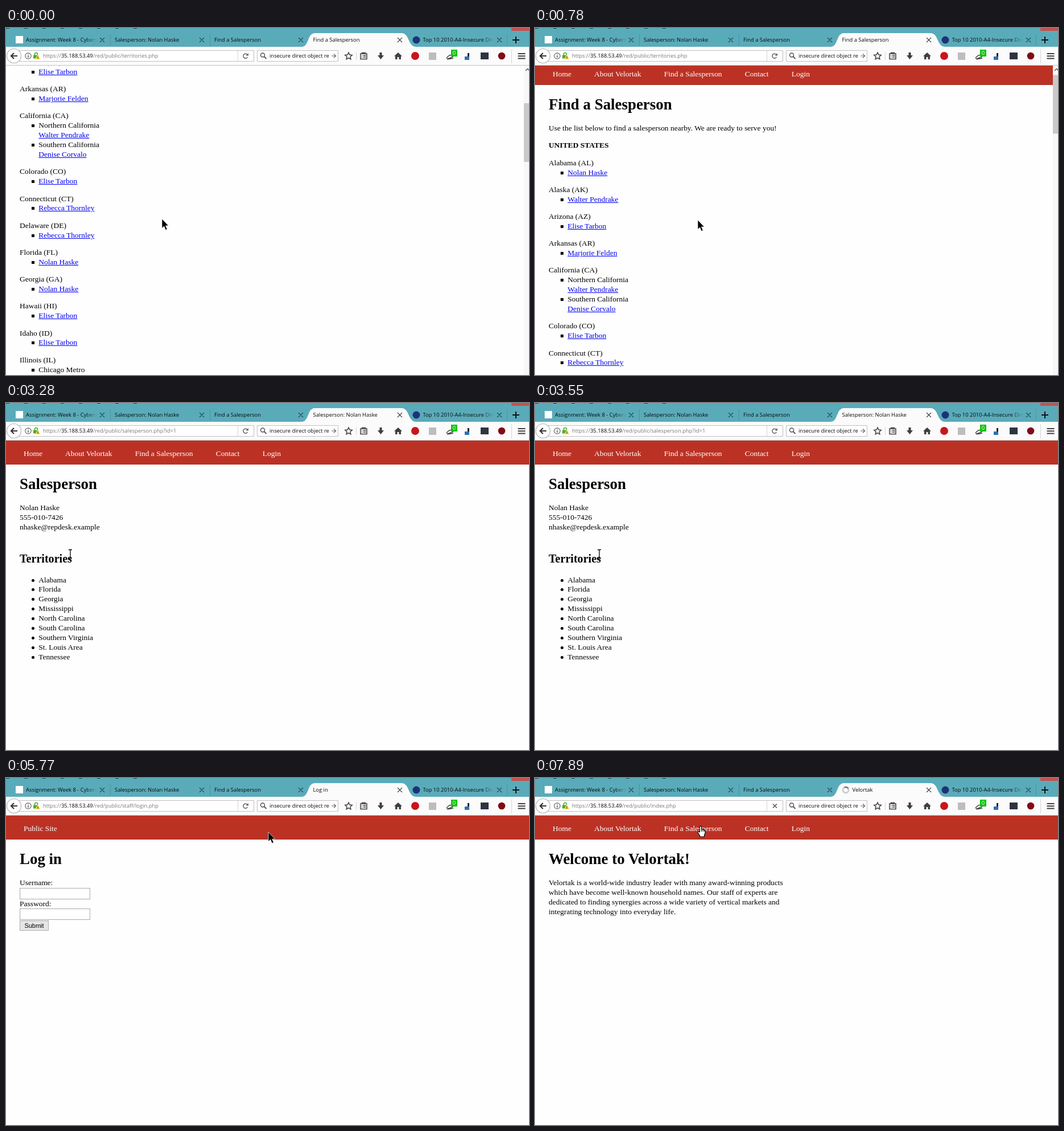
An HTML page that plays this animation: 919x609 px, repeating every 8000 ms.

```html
<!DOCTYPE html>
<html lang="en">
<head>
<meta charset="utf-8">
<title>Browser session</title>
<style>
/* One loop is 8 s, so 1% is 80 ms. */
@property --n { syntax: "<number>"; inherits: true; initial-value: 0; }
@property --y { syntax: "<number>"; inherits: true; initial-value: 0; }
@property --busy { syntax: "<number>"; inherits: true; initial-value: 0; }

html, body { margin: 0; width: 100%; height: 100%; overflow: hidden; background: #fefefe; }
#stage { position: absolute; left: 0; top: 0; width: 919px; height: 609px; overflow: hidden; white-space: nowrap; }
#stage, #stage * { box-sizing: border-box; }
.abs, .chrome > * { position: absolute; }
.chrome, .view, .reel, .spin, .cursor, .cursor g { animation: 8s step-end infinite; }

/* Browser frame */
.chrome { position: absolute; inset: 0; height: 66px; color: #0a0a0a;
  font: 9.4px/14px "Open Sans", "Noto Sans", sans-serif; }
.chrome { animation-name: busy; }
.chrome svg { left: 0; top: 0; }
.tab { top: 14px; height: 14px; overflow: hidden; }
.fade { mask-image: linear-gradient(to left, transparent, #000 22px); }
.title { left: 539.5px; width: 143px; padding-left: calc(var(--busy) * 18px); }
.url { left: 65px; top: 42px; width: 340px; height: 14px; overflow: hidden; color: #777; }
.url b { font-weight: 400; color: #0a0a0a; }
.reel { height: 100%; transform: translateY(calc(var(--n) * -100%)); }
.reel > div { height: 100%; }
.title .reel { animation-name: titles; }
.url .reel { animation-name: urls; }
.when-busy { opacity: var(--busy); }
.when-idle { opacity: calc(1 - var(--busy)); }
.spin { transform-origin: 546px 21px; animation-name: spin; }

/* Web pages */
.view { left: 0; top: 66px; width: 919px; height: 543px; overflow: hidden; color: #000;
  font: 13.48px/16.9px "Liberation Serif", "Times New Roman", serif; animation-name: scroll; }
.pages { animation-name: pages; }
.page { position: relative; overflow: hidden; }
.sheet { width: 910px; transform: translateY(calc(var(--y) * -1px)); }
nav { height: 42px; padding: 14.6px 0 0 31px; display: flex; gap: 40.2px; background: #bb3225; color: #fff; border-bottom: 1px solid #a92c20; }
h1 { font-size: 26.9px; line-height: 32px; margin: 18px 24px; }
h2 { font-size: 20.1px; line-height: 24px; margin: 34.2px 24px 17.6px; }
p { margin: 13.4px 24px 0; }
ul { list-style: none; margin: 0; padding: 0 0 0 57.3px; }
li { position: relative; }
li::before { content: ""; position: absolute; left: -12px; top: 6px; width: 5px; height: 5px; background: #000; }
.disc li::before { border-radius: 50%; }
u { color: #00e; }
.plain ul { padding: 14px 0 0 37px; }
.plain u { color: #551a8b; }
.plain h1 { margin: 17.5px 4px 18px; }
.plain p { margin: 0 4px; }
.field { left: 23.5px; width: 124px; height: 20px; border: 1px solid #aaa; background: #fff; }
.button { left: 24px; top: 183.5px; width: 51px; height: 18px; border: 1px solid #adadad; background: #e6e6e6;
  font: 11px/17px "Liberation Sans", Arial, sans-serif; text-align: center; }
.track { left: 910px; top: 0; width: 9px; height: 543px; background: #f7f7f7; }
.thumb { left: 0; top: 15px; width: 9px; height: 103px; background: #c9c9c9; transform: translateY(calc(var(--y) * .183px)); }

/* Pointer */
.cursor { left: 0; top: 0; overflow: visible; animation-name: move; }
.cursor .arrow { animation-name: arrow; }
.cursor .hand { animation-name: hand; }
.cursor .beam { animation-name: beam; }

@keyframes scroll {
  0% { --y: 279; } 1.625% { --y: 246; } 3.25% { --y: 196; } 4.875% { --y: 138; }
  6.5% { --y: 84; } 8.125% { --y: 36; } 9.75% { --y: 8; } 11.5%, 100% { --y: 0; }
}
@keyframes pages {
  0% { --n: 0; } 41% { --n: 1; } 66.875% { --n: 2; } 85.125% { --n: 3; } 92.125%, 100% { --n: 4; }
}
@keyframes titles {
  0% { --n: 0; } 35.875% { --n: 1; } 41% { --n: 2; } 58.75% { --n: 1; }
  66.875% { --n: 3; } 85.125%, 100% { --n: 4; }
}
@keyframes urls {
  0% { --n: 0; } 35.875% { --n: 1; } 58.75% { --n: 2; } 85.125%, 100% { --n: 3; }
}
@keyframes busy {
  0%, 41%, 66.875%, 92.125% { --busy: 0; }
  29%, 57.25%, 80.125%, 98.625%, 100% { --busy: 1; }
}
@keyframes spin {
  0%, 29% { color: #777; transform: none; }
  30.5% { color: #777; transform: rotate(-120deg); }
  32.125% { color: #777; transform: rotate(-240deg); }
  35.875% { color: #3a9be0; transform: rotate(60deg); }
  57.25% { color: #777; transform: rotate(-60deg); }
  58.75% { color: #3a9be0; transform: rotate(40deg); }
  63.5% { color: #3a9be0; transform: rotate(160deg); }
  80.125% { color: #777; transform: none; }
  81.625% { color: #777; transform: rotate(-120deg); }
  85.125% { color: #3a9be0; transform: rotate(20deg); }
  90.125% { color: #3a9be0; transform: rotate(120deg); }
  98.625%, 100% { color: #777; transform: rotate(-30deg); }
}
@keyframes move {
  0% { transform: translate(274px, 335px); }
  6.5% { transform: translate(279px, 336px); }
  9.75% { transform: translate(286px, 337px); }
  16.5% { transform: translate(268px, 331px); }
  18.25% { transform: translate(218px, 306px); }
  20% { transform: translate(162px, 282px); }
  21.875% { transform: translate(120px, 266px); }
  23.625% { transform: translate(114px, 264px); }
  41% { transform: translate(113px, 265px); }
  46.25% { transform: translate(150px, 242px); }
  48.125% { transform: translate(240px, 195px); }
  49.875% { transform: translate(350px, 142px); }
  51.625% { transform: translate(435px, 106px); }
  53.375% { transform: translate(463px, 94px); }
  70.375% { transform: translate(462px, 95px); }
  72.125% { transform: translate(461px, 95px); }
  73.75% { transform: translate(385px, 98px); }
  75.375% { transform: translate(250px, 98px); }
  77% { transform: translate(125px, 96px); }
  78.625% { transform: translate(64px, 92px); }
  85.125% { transform: translate(72px, 90px); }
  86.875% { transform: translate(150px, 84px); }
  88.5% { transform: translate(232px, 78px); }
  90.125% { transform: translate(276px, 75px); }
  92.125% { transform: translate(281px, 78px); }
  93.625% { transform: translate(290px, 84px); }
  98.625%, 100% { transform: translate(291px, 84px); }
}
@keyframes arrow {
  0%, 46.25%, 66.875%, 85.125% { visibility: visible; }
  21.875%, 53.375%, 78.625%, 93.625%, 100% { visibility: hidden; }
}
@keyframes hand {
  0%, 41%, 66.875%, 85.125% { visibility: hidden; }
  21.875%, 53.375%, 78.625%, 93.625%, 100% { visibility: visible; }
}
@keyframes beam {
  0%, 46.25%, 100% { visibility: hidden; }
  41% { visibility: visible; }
}
</style>
</head>
<body>
<div id="stage">

<div class="view abs"><div class="reel pages">
  <div class="page">
    <div class="sheet">
      <nav><span>Home</span><span>About Velortak</span><span>Find a Salesperson</span><span>Contact</span><span>Login</span></nav>
      <h1>Find a Salesperson</h1>
      <p>Use the list below to find a salesperson nearby. We are ready to serve you!</p>
      <p><b>UNITED STATES</b></p>
      <p>Alabama (AL)</p><ul><li><u>Nolan Haske</u></li></ul>
      <p>Alaska (AK)</p><ul><li><u>Walter Pendrake</u></li></ul>
      <p>Arizona (AZ)</p><ul><li><u>Elise Tarbon</u></li></ul>
      <p>Arkansas (AR)</p><ul><li><u>Marjorie Felden</u></li></ul>
      <p>California (CA)</p><ul><li>Northern California<br><u>Walter Pendrake</u></li><li>Southern California<br><u>Denise Corvalo</u></li></ul>
      <p>Colorado (CO)</p><ul><li><u>Elise Tarbon</u></li></ul>
      <p>Connecticut (CT)</p><ul><li><u>Rebecca Thornley</u></li></ul>
      <p>Delaware (DE)</p><ul><li><u>Rebecca Thornley</u></li></ul>
      <p>Florida (FL)</p><ul><li><u>Nolan Haske</u></li></ul>
      <p>Georgia (GA)</p><ul><li><u>Nolan Haske</u></li></ul>
      <p>Hawaii (HI)</p><ul><li><u>Elise Tarbon</u></li></ul>
      <p>Idaho (ID)</p><ul><li><u>Elise Tarbon</u></li></ul>
      <p>Illinois (IL)</p><ul><li>Chicago Metro</li></ul>
    </div>
    <div class="track abs">
      <div class="thumb abs"></div>
      <svg class="abs" width="9" height="14"><path d="M3 9l3.5-3.5L10 9" fill="none" stroke="#555" stroke-width="1.4"/></svg>
    </div>
  </div>

  <div class="page">
    <nav><span>Home</span><span>About Velortak</span><span>Find a Salesperson</span><span>Contact</span><span>Login</span></nav>
    <h1>Salesperson</h1>
    <p>Nolan Haske<br>555-010-7426<br>nhaske@repdesk.example</p>
    <h2>Territories</h2>
    <ul class="disc">
      <li>Alabama</li><li>Florida</li><li>Georgia</li><li>Mississippi</li><li>North Carolina</li>
      <li>South Carolina</li><li>Southern Virginia</li><li>St. Louis Area</li><li>Tennessee</li>
    </ul>
  </div>

  <div class="page">
    <nav><span>Public Site</span></nav>
    <h1>Log in</h1>
    <p>Username:</p>
    <div class="field abs" style="top:127px"></div>
    <div class="abs" style="left:24px;top:146.6px">Password:</div>
    <div class="field abs" style="top:163px"></div>
    <div class="button abs">Submit</div>
  </div>

  <div class="page plain">
    <ul class="disc">
      <li><u>Home</u></li><li><u>About Velortak</u></li><li><u>Find a Salesperson</u></li><li><u>Contact</u></li><li><u>Login</u></li>
    </ul>
    <h1>Welcome to Velortak!</h1>
    <p>Velortak is a world-wide industry leader with many award-winning products which have become well-known household names. Our staff of experts are dedicated to<br>finding synergies across a wide variety of vertical markets and integrating technology into everyday life.</p>
  </div>

  <div class="page">
    <nav><span>Home</span><span>About Velortak</span><span>Find a Salesperson</span><span>Contact</span><span>Login</span></nav>
    <h1>Welcome to Velortak!</h1>
    <p>Velortak is a world-wide industry leader with many award-winning products<br>which have become well-known household names. Our staff of experts are<br>dedicated to finding synergies across a wide variety of vertical markets and<br>integrating technology into everyday life.</p>
  </div>
</div></div>

<div class="chrome">
  <svg width="919" height="66" fill="none" stroke-width="1.2">
    <path fill="#5aabba" d="M0 0h919v33H0z"/>
    <path d="M0 .5h240" stroke="#1d3940" stroke-width="1" stroke-dasharray="6 26"/>
    <path fill="#c9504f" d="M888 0h31v5h-31z"/>
    <path d="M183.5 11v20M358.5 11v20M880.5 11v20" stroke="#4894a2" stroke-width="1"/>
    <path fill="#fbfbfb" d="M0 33H520C533 32 529 9 543 9H695C709 9 706 32 720 33H919V65H0z"/>
    <path d="M0 65.5h919" stroke="#c4c4c4" stroke-width="1"/>
    <path fill="#fff" d="M17 14h13v13H17z"/>
    <circle cx="721" cy="21" r="6.5" fill="#1c3377"/>
    <path d="M165 17l8 8m0-8l-8 8M340 17l8 8m0-8l-8 8M514 17l8 8m0-8l-8 8M863 17l8 8m0-8l-8 8" stroke="#244a53"/>
    <path d="M688 17l8 8m0-8l-8 8" stroke="#444"/>
    <path d="M890 21h12m-6-6v12" stroke="#111" stroke-width="2"/>
    <!-- address and search boxes -->
    <path d="M20.5 39.5h415v19h-415zM441.5 39.5h142v19h-142z" fill="#fff" stroke="#c0c0c0" stroke-width="1"/>
    <path d="M407.5 40v18" stroke="#d4d4d4" stroke-width="1"/>
    <circle cx="14" cy="49" r="12.5" fill="#fff" stroke="#b4b4b4"/>
    <path d="M20 49H9m5-5l-5 5 5 5" stroke="#333" stroke-width="2.2"/>
    <circle cx="39" cy="49" r="5.2" stroke="#666"/>
    <path d="M39 48v4M39 45.5v1.3" stroke="#555" stroke-width="1.4"/>
    <path d="M50.5 48v-2a2.5 2.5 0 0 1 5 0v2" stroke="#4caf26" stroke-width="1.6"/>
    <path d="M48 47.5h9v6h-9z" fill="#4caf26"/>
    <path d="M56 47l4.5 8h-9z" fill="#f7c52d" stroke="#fff" stroke-width=".6"/>
    <path d="M56 50v2.5m0 .6v1" stroke="#333" stroke-width="1"/>
    <g class="when-idle">
      <path d="M424.5 51a4 4 0 1 1-.4-4.3" stroke="#666" stroke-width="1.5"/>
      <path d="M426 44v4.5h-4.5z" fill="#666"/>
    </g>
    <path class="when-busy" d="M418 45.5l7 7m0-7l-7 7" stroke="#555" stroke-width="1.5"/>
    <circle cx="451" cy="47.5" r="3.5" stroke="#555" stroke-width="1.5"/>
    <path d="M453.5 50l4 4" stroke="#555" stroke-width="1.8"/>
    <path d="M572 49h7m-3-3.5l3.5 3.5-3.5 3.5" stroke="#666"/>
    <!-- toolbar -->
    <path d="M602 43l1.9 4 4.3.5-3.2 3 .8 4.4-3.8-2.2-3.8 2.2.8-4.4-3.2-3 4.3-.5z" stroke="#3f3f3f" stroke-width="1.5"/>
    <path d="M615.5 42v14M888.5 37v25" stroke="#d6d6d6" stroke-width="1"/>
    <path d="M623 45h11v9.5h-11zM625.5 45v-1.5h6V45M625 48h1m1.5 0h5m-7.500 3h1m1.5 0h5" stroke="#3f3f3f" stroke-width="1.5"/>
    <path d="M656.5 43h4v5h3.5l-5.500 7-5.500-7h3.5z" fill="#3f3f3f"/>
    <path d="M689 43l7 6.5h-2V55h-3.5v-4h-3v4H684v-5.500h-2z" fill="#3f3f3f"/>
    <circle cx="719" cy="49" r="7" fill="#c8151d"/>
    <path d="M743 43h13v13h-13z" fill="#bdbdbd"/>
    <path d="M774 53q5-7 10-5t-5 5 7 0" stroke="#444" stroke-width="1.6"/>
    <path d="M782 38h11v12h-11z" fill="#0bc40b"/>
    <path d="M806 50h8v6h-8z" fill="#2d70b5"/><path d="M811 44h3v6h-3z" fill="#222"/>
    <path d="M834 43h14v12h-14z" fill="#2d3440"/>
    <circle cx="871" cy="49" r="6.3" fill="#800b16"/>
    <path d="M899.5 45h13m-13 4.3h13m-13 4.3h13" stroke="#3f3f3f" stroke-width="2"/>
    <g class="when-busy"><g class="spin" stroke="currentColor" stroke-width="2.6">
      <circle cx="546" cy="21" r="5" stroke-opacity=".4"/>
      <path d="M546 16a5 5 0 0 1 5 5"/>
    </g></g>
  </svg>
  <div class="tab fade" style="left:35px;width:126px">Assignment: Week 8 - Cybersecurity</div>
  <div class="tab" style="left:191px;width:140px">Salesperson: Nolan Haske</div>
  <div class="tab" style="left:366px;width:140px">Find a Salesperson</div>
  <div class="tab title fade"><div class="reel">
    <div>Find a Salesperson</div>
    <div>https://35.188.53.49/red/public/</div>
    <div>Salesperson: Nolan Haske</div>
    <div>Log in</div>
    <div>Velortak</div>
  </div></div>
  <div class="tab fade" style="left:732.5px;width:125px">Top 10 2010-A4-Insecure Direct Object</div>
  <div class="url"><div class="reel">
    <div>https://<b>35.188.53.49</b>/red/public/territories.php</div>
    <div>https://<b>35.188.53.49</b>/red/public/salesperson.php?id=1</div>
    <div>https://<b>35.188.53.49</b>/red/public/staff/login.php</div>
    <div>https://<b>35.188.53.49</b>/red/public/index.php</div>
  </div></div>
  <div style="left:463px;top:42px;width:105px;overflow:hidden">insecure direct object reference</div>
  <div style="left:782px;top:37px;width:11px;text-align:center;color:#fff">0</div>
</div>

<svg class="cursor abs" width="1" height="1" stroke-linejoin="round">
  <g class="arrow"><path d="M0 0V16.5L3.7 13 6.5 19.5 9.3 18.3 6.5 12H11.5z" fill="#000" stroke="#fff" stroke-width=".7"/></g>
  <g class="hand"><path d="M-1.5 11V1.3Q0-.6 1.5 1.3V6Q3 5 4 6.5 5.5 5.6 6.3 7.2 8 6.8 8 8.5V13L6.5 16V19H-1.5V17L-5 11.5Q-4.5 8.8-1.5 11z" fill="#fff" stroke="#000" stroke-width="1.1"/><path d="M1.5 6v4M4 6.5v3.5M6.3 7.2V10" stroke="#000"/></g>
  <g class="beam"><path d="M-3-7.5h2.5l.5.5.5-.5H3M0-7V7M-3 7.5h2.5L0 7l.5.5H3" fill="none" stroke="#000" stroke-width="1.3"/></g>
</svg>

</div>
</body>
</html>
```
